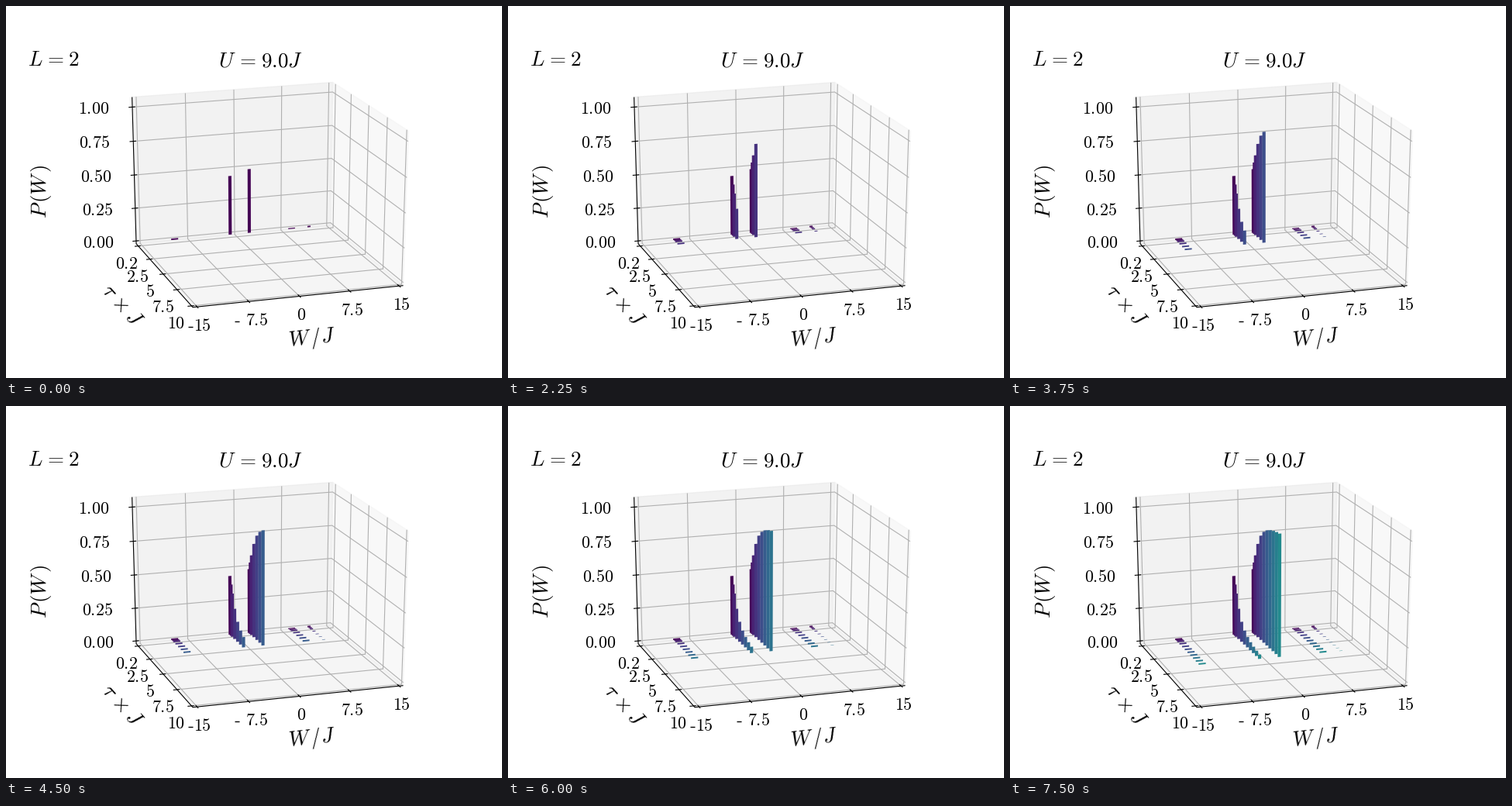
A matplotlib script that plays this animation: 640 px wide and 480 px high, repeating every 8000 ms.

```python
import numpy as np
import matplotlib.pyplot as plt
from matplotlib.animation import FuncAnimation

plt.rcParams["mathtext.fontset"] = "cm"
WIDTH, HEIGHT, DPI = 640, 480, 100
TICK_SIZE, LABEL_SIZE = 15.8, 19.5
EM = TICK_SIZE * DPI / 72

fig = plt.figure(figsize=(WIDTH / DPI, HEIGHT / DPI), dpi=DPI, facecolor="white")
ax = fig.add_axes([0, 0, 1, 1])
ax.set_xlim(-0.5, WIDTH - 0.5)
ax.set_ylim(HEIGHT - 0.5, -0.5)
ax.axis("off")

# Unit box (W, tau, P): where its visible corners and two edge middles land.
ANCHORS = {
    (0, 0, 0): (167.5, 306), (0, 0, 1): (161.5, 117.5), (0.5, 0, 1): (294, 107.5),
    (1, 0, 0): (417.5, 282.5), (1, 0, 1): (422, 98), (0.5, 1, 0): (379, 374),
    (1, 1, 0): (512, 361), (1, 1, 1): (518, 160), (0, 1, 0): (240.5, 388),
}


def fit_camera(anchors):
    """Least-squares 3x4 perspective matrix through the anchor points."""
    rows, rhs = [], []
    for (u, v, w), (x, y) in anchors.items():
        rows.append([u, v, w, 1, 0, 0, 0, 0, -x * u, -x * v, -x * w])
        rows.append([0, 0, 0, 0, u, v, w, 1, -y * u, -y * v, -y * w])
        rhs += [x, y]
    sol = np.linalg.lstsq(np.array(rows, float), np.array(rhs, float), rcond=None)[0]
    return np.append(sol, 1).reshape(3, 4)


CAMERA = fit_camera(ANCHORS)


def project(points):
    pts = np.asarray(points, float)
    hom = np.c_[pts, np.ones(len(pts))] @ CAMERA.T
    return hom[:, :2] / hom[:, 2:]


def unit(value, low, high):
    """Data value to box coordinate, with a 2 % margin at both ends."""
    return 0.02 + 0.96 * (np.asarray(value, float) - low) / (high - low)


def work(value):
    return unit(value, -15, 15)


def time(value):
    return unit(value, 0, 10)


def prob(value):
    return unit(value, 0, 1.05)


def line(points, color, zorder):
    x, y = project(points).T
    ax.plot(x, y, color=color, lw=0.8, zorder=zorder, solid_capstyle="butt")


def grid(points):
    line(points, "#b0b0b0", 2)


def edge(points):
    line(points, "black", 3)


def polygon(points, **style):
    return ax.add_patch(plt.Polygon(project(points), closed=True, **style))


def label(x, y, text, size=LABEL_SIZE, ha="center", rotation=0):
    ax.text(x, y, f"${text}$", size=size, ha=ha, va="baseline",
            rotation=rotation, rotation_mode="anchor", color="black", zorder=5)


def tick_label(x, y, text):
    """Centred number; a leading minus is set as a short text hyphen."""
    digits = text.lstrip("- ")
    lead = EM / 3 * (len(text) - len(digits))
    label(x + lead / 2, y, digits, TICK_SIZE)
    if lead:
        dots = digits.count(".")
        total = lead + EM * (0.5 * (len(digits) - dots) + 0.278 * dots)
        left, mid = x - total / 2, y - 0.216 * EM
        ax.plot([left, left + 0.27 * EM], [mid, mid], color="black", lw=1,
                solid_capstyle="butt", zorder=5)


def draw_panes():
    panes = [
        (0.90, [(0, 0, 0), (1, 0, 0), (1, 0, 1), (0, 0, 1)]),
        (0.95, [(1, 0, 0), (1, 1, 0), (1, 1, 1), (1, 0, 1)]),
        (0.925, [(0, 0, 0), (1, 0, 0), (1, 1, 0), (0, 1, 0)]),
    ]
    for gray, corners in panes:
        polygon(corners, color=(gray,) * 3, alpha=0.5, lw=1, zorder=1)


def draw_axes():
    edge([(0, 0, 1), (0, 0, 0), (0, 1, 0), (1, 1, 0)])

    for text in ["-15", "- 7.5", "0", "7.5", "15"]:
        u = work(text.replace(" ", ""))
        grid([(u, 0, 1), (u, 0, 0), (u, 1, 0)])
        edge([(u, 0.975, 0), (u, 1.02, 0)])
        x, y = project([(u, 1, 0)])[0]
        tick_label(x + 2.8, y + 30.7, text)

    for text in ["0.2", "2.5", "5", "7.5", "10"]:
        v = time(text)
        grid([(1, v, 1), (1, v, 0), (0, v, 0)])
        edge([(-0.018, v, 0), (0.012, v, 0)])
        x, y = project([(0, v, 0)])[0]
        tick_label(x - 14.5 - 5 * v, y + 29, text)

    for text in ["0.00", "0.25", "0.50", "0.75", "1.00"]:
        w = prob(text)
        grid([(0, 0, w), (1, 0, w), (1, 1, w)])
        edge([(-0.018, 0, w), (0.014, 0, w)])
        x, y = project([(-0.188, 0, w)])[0]
        tick_label(x, y + 4.6, text)


def draw_titles():
    label(27.5, 76.5, r"L\hspace{0.08}=\hspace{0.08}2", ha="left")
    label(273.8, 78, r"U\hspace{0.18}=\hspace{0.08}9.0J", ha="left")
    label(51.5, 238.5, r"P\hspace{0.13}(W\hspace{0.13})", rotation=90)
    label(395.5, 435.5, r"W\hspace{0.13}/J", rotation=6)
    label(144.3, 391, r"\tau\hspace{0.12}\times\hspace{0.02}J", rotation=-48)


TAUS = np.r_[0.2:0.7:0.2, 1:4.6:0.5]
COLOR_STEPS = 21


def draw_row(step):
    """All bars of one ramp time, flat and facing the viewer."""
    tau = TAUS[step]
    v = time(tau)
    low_peak = 0.48 / (1 + 1.08 * tau ** 1.7)
    fade = np.exp(-tau)
    bars = [
        (-9.9, 1.1, 0.011),
        (-1.08, 0.5, low_peak),
        (1.98, 0.5, 0.937 - low_peak),
        (8.83, 1.1, 0.012 - 0.006 * fade),
        (11.66, 0.5, 0.002 + 0.011 * fade),
    ]
    color = plt.cm.viridis(step / COLOR_STEPS)
    row = []
    for center, width, height in bars:
        a, b = work([center - width / 2, center + width / 2])
        low, high = prob([0, height])
        corners = [(a, v, low), (b, v, low), (b, v, high), (a, v, high)]
        row.append(polygon(corners, facecolor=color, lw=0, zorder=10 + step))
    return row


draw_panes()
draw_axes()
draw_titles()
rows = [draw_row(step) for step in range(len(TAUS))]


def update(frame):
    step = frame // 3
    for k, row in enumerate(rows):
        for bar in row:
            bar.set_visible(k <= step)
    return [bar for row in rows for bar in row]


def reset():
    return update(0)


anim = FuncAnimation(fig, update, frames=32, interval=250, init_func=reset,
                     repeat=True, repeat_delay=0, blit=False)
plt.show()
```
